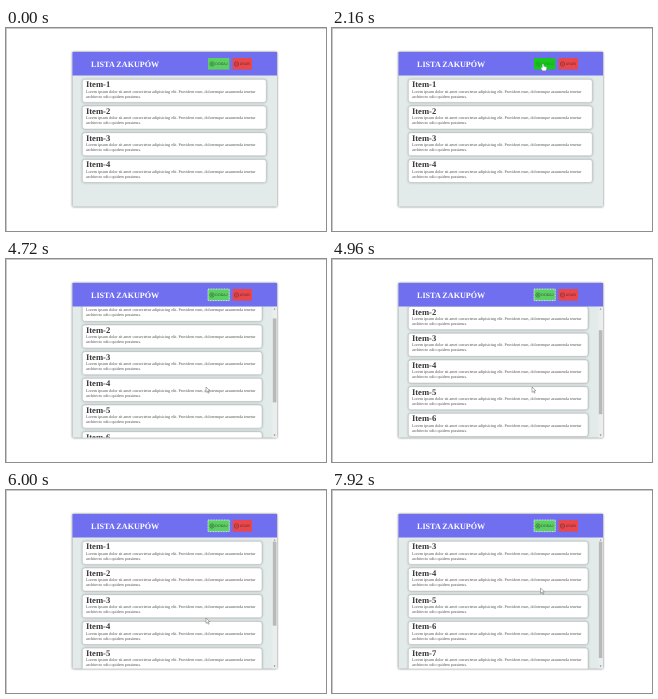
An HTML page for the animation above (8000 ms loop, 320 px wide and 203 px high).

```html
<!DOCTYPE html>
<html lang="pl">
<head>
<meta charset="utf-8">
<title>Lista zakupów</title>
<style>
html, body { margin: 0; width: 100%; height: 100%; overflow: hidden; background: #fff; }
svg { display: block; width: 320px; height: 203px; }
text { font-family: "Liberation Serif", "Times New Roman", serif; text-rendering: geometricPrecision; }
.title { font-size: 8.15px; font-weight: bold; fill: #fff; }
.name { font-size: 8.6px; font-weight: bold; fill: #3a3a3a; }
.body { font-size: 4.1px; fill: #4a4a4a; }
.label { font-family: "Liberation Sans", Arial, sans-serif; font-size: 3.6px; fill: #222; }
.icon { fill: none; stroke: #222; stroke-width: .5; }
.box { fill: #fff; stroke: #b0b7b7; stroke-width: .5; filter: drop-shadow(0 .3px .8px #7778); }
.focus { fill: none; stroke: #fff; stroke-width: .7; stroke-dasharray: 1 .6; }
.cursor { fill: #fff; stroke: #555; stroke-width: .45; stroke-linejoin: round; }
#hand { stroke: #678; stroke-width: .25; }
</style>
</head>
<body>
<svg viewBox="0 0 320 203">
  <defs>
    <clipPath id="view"><rect x="66.5" y="47.5" width="204.5" height="131"/></clipPath>
  </defs>
  <rect width="320" height="203" fill="#fff"/>
  <path d="M0 .4H320M.4 0V203" stroke="#b4b4b4" stroke-width=".8"/>
  <rect x="66.5" y="24" width="204.5" height="154.7" fill="#e2eaea" style="filter:drop-shadow(0 0 1.3px #666)"/>
  <g clip-path="url(#view)"><g id="list"></g></g>
  <g id="bar">
    <rect x="266.3" y="47.5" width="4.7" height="131" fill="#eaeeee"/>
    <path d="M267.6 50.6l1-1.3 1 1.3zM267.6 175.6l1 1.3 1-1.3z" fill="#777"/>
    <rect id="thumb" x="266.8" width="3.6" fill="#b7b9b9"/>
  </g>
  <rect x="66.5" y="24" width="204.5" height="23.5" fill="#706ff0"/>
  <text class="title" x="85" y="38.6">LISTA ZAKUPÓW</text>
  <g id="add">
    <rect x="202" y="30" width="21.3" height="11.6"/>
    <g class="ink">
      <circle class="icon" cx="206" cy="36" r="2.2"/>
      <path class="icon" d="M204.8 36h2.4M206 34.8v2.4"/>
      <text class="label" x="209.3" y="37.3">DODAJ</text>
    </g>
    <rect id="focus" class="focus" x="202" y="30" width="21.3" height="11.6"/>
  </g>
  <g id="del">
    <rect x="226.7" y="30" width="19.3" height="11.6"/>
    <g class="ink">
      <circle class="icon" cx="230.5" cy="36" r="2.2"/>
      <path class="icon" d="M229.3 36h2.4"/>
      <text class="label" x="233.7" y="37.3">USUŃ</text>
    </g>
  </g>
  <path id="arrow" class="cursor" d="M0 0V5.4L1.3 4.2 2.2 6.2 3.1 5.8 2.2 3.8H3.9Z"/>
  <path id="hand" class="cursor" d="M-.7 .2Q0-.6 .7 .2V2.2L3 2.8Q3.8 3.2 3.6 4.4L2.9 6.7H-.4L-2.1 4.2Q-2.1 3-.7 3.7Z"/>
</svg>
<script>
const $ = id => document.getElementById(id);
const LOOP = 8000, STEP = 80;
const PITCH = 26.7, VIEW = 131, TRACK = 123, ENTER = 960;

const addClicks = [2400, 3040, 3920];
const delClicks = [6720, 7280];
const entry = { x: 312, y: 130 };
const moves = [
  { from: ENTER, to: 1840, x: 211, y: 36 },
  { from: 4000, to: 4400, x: 200, y: 128 },
  { from: 6080, to: 6560, x: 236, y: 37 },
  { from: 7440, to: 7840, x: 208.5, y: 98 }
];

// Smooth 0..1 progress between two times
function ease(t, from, to) {
  const p = Math.min(1, Math.max(0, (t - from) / (to - from)));
  return p * p * (3 - 2 * p);
}

function cursorAt(t) {
  return moves.reduce((pos, m) => {
    const p = ease(t, m.from, m.to);
    return { x: pos.x + (m.x - pos.x) * p, y: pos.y + (m.y - pos.y) * p };
  }, entry);
}

const clicked = (times, t) => times.filter(c => c <= t).length;
const show = (el, on) => el.setAttribute("display", on ? "inline" : "none");

const items = Array.from({ length: 4 + addClicks.length }, (_, i) => {
  const g = document.createElementNS("http://www.w3.org/2000/svg", "g");
  g.innerHTML = `<rect class="box" x="76.3" y="51.3" height="23.1" rx="2.6"/>
    <text class="name" x="79.9" y="59.3">Item-${i + 1}</text>
    <text class="body" x="80" y="64.5">Lorem ipsum dolor sit amet consectetur adipisicing elit. Provident eum, doloremque assumenda tenetur</text>
    <text class="body" x="80" y="69.5">architecto odio quidem possimus.</text>`;
  $("list").append(g);
  return g;
});

function paintButton(id, pos, base, bright) {
  const rect = $(id).querySelector("rect");
  const { x, y, width, height } = rect.getBBox();
  const over = pos.x >= x && pos.x <= x + width && pos.y >= y && pos.y <= y + height;
  rect.setAttribute("fill", over ? bright : base);
  $(id).querySelector(".ink").setAttribute("opacity", over ? .3 : .75);
  return over;
}

function render(t) {
  const first = clicked(delClicks, t);
  const end = 4 + clicked(addClicks, t);
  const count = end - first, full = count > 4;
  const height = Math.max(VIEW, count * PITCH + 5);
  const offset = (height - VIEW) * (ease(t, 4400, 5520) - ease(t, 5760, 5920));

  items.forEach((g, i) => {
    show(g, i >= first && i < end);
    g.setAttribute("transform", `translate(0 ${(i - first) * PITCH - offset})`);
    g.firstChild.setAttribute("width", full ? 179.7 : 184);
  });

  show($("bar"), full);
  $("thumb").setAttribute("y", 51.7 + offset / height * TRACK);
  $("thumb").setAttribute("height", VIEW / height * TRACK);

  const pos = cursorAt(t);
  const onAdd = paintButton("add", pos, "#5bcf62", "#18c71e");
  const onDel = paintButton("del", pos, "#e9474b", "#ee1c20");
  const over = onAdd || onDel;
  show($("focus"), full && !onAdd);
  show($("arrow"), t >= ENTER && !over);
  show($("hand"), over);
  for (const id of ["arrow", "hand"]) $(id).setAttribute("transform", `translate(${pos.x} ${pos.y})`);
}

const start = performance.now();
function tick(now) {
  const t = Math.max(0, now - start) % LOOP;
  render(Math.floor(t / STEP) * STEP);
  requestAnimationFrame(tick);
}
render(0);
requestAnimationFrame(tick);
</script>
</body>
</html>
```
